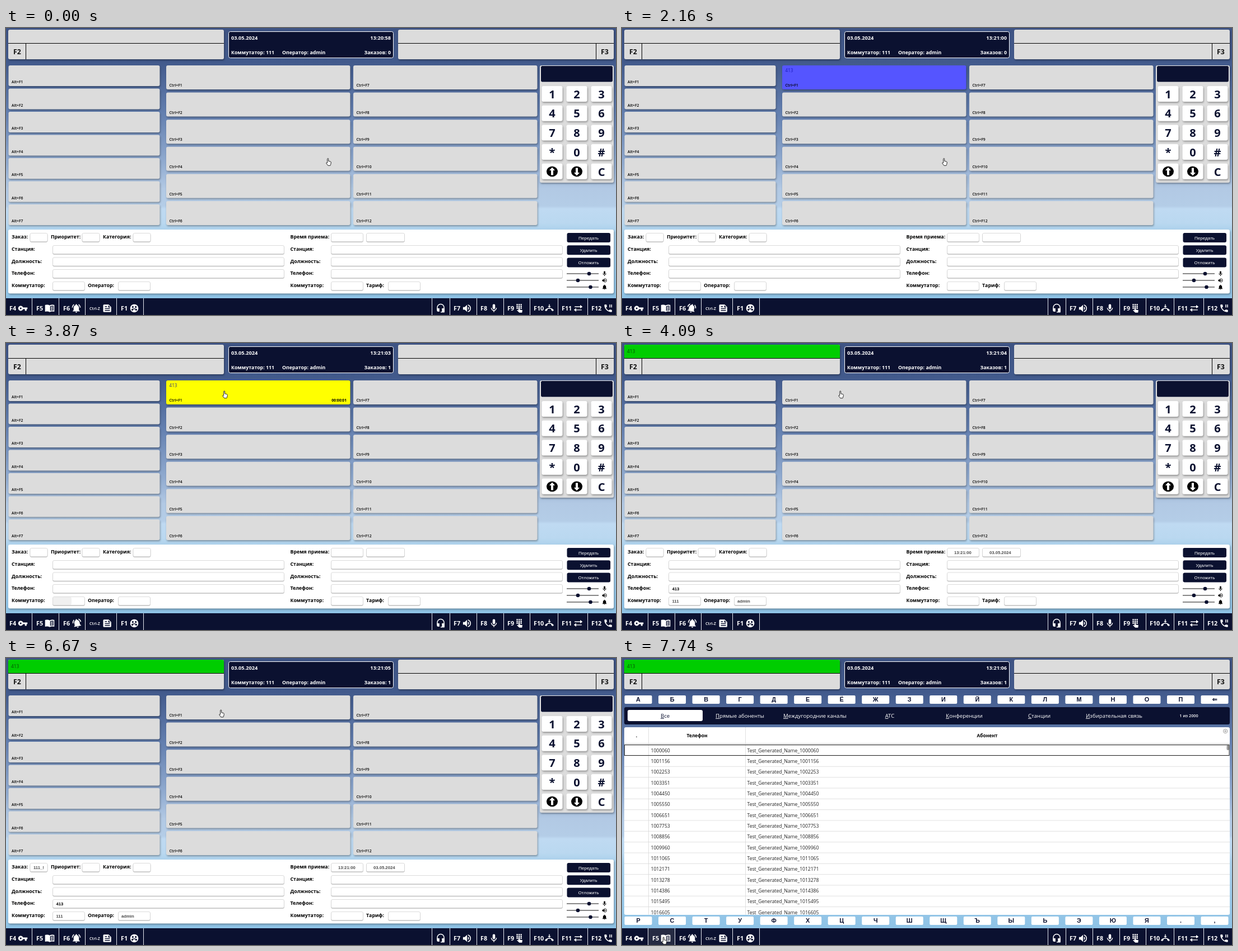
An HTML page for the animation above (8 s loop, 1089 by 514 pixels).

```html
<!DOCTYPE html>
<html lang="ru">
<head>
<meta charset="utf-8">
<title>Пульт оператора</title>
<style>
  html, body { margin: 0; width: 100%; height: 100%; overflow: hidden; background: #3f5584; }
  svg { display: block; width: 1089px; height: 514px; }
  text { font-family: "Open Sans", "Noto Sans", sans-serif; white-space: pre; }
  .b { font-weight: 700; }
  .s { font-weight: 600; }
  .arial { font-family: "Liberation Sans", Arial, sans-serif; }
  .shadow { filter: drop-shadow(1px 2px 1.5px rgba(0, 0, 0, .32)); }
  .soft { filter: drop-shadow(.5px 1px .6px rgba(0, 0, 0, .25)); }
</style>
</head>
<body>
<svg id="stage" viewBox="0 0 1089 514" xmlns="http://www.w3.org/2000/svg"></svg>
<script>
const NAVY = '#0b1130', GREY = '#dcdcdc', LOOP = 8000;

const range = (n, fn) => Array.from({ length: n }, (_, i) => fn(i)).join('');
const rect = (x, y, w, h, fill, r = 3, more = '') =>
  `<rect x="${x}" y="${y}" width="${w}" height="${h}" rx="${r}" fill="${fill}" ${more}/>`;
const line = (x1, y1, x2, y2, color = '#000', w = 1) =>
  `<path d="M${x1} ${y1}L${x2} ${y2}" stroke="${color}" stroke-width="${w}" fill="none"/>`;
const text = (x, y, str, size, fill = '#000', cls = 'b', anchor = 'start', more = '') =>
  `<text x="${x}" y="${y}" font-size="${size}" fill="${fill}" class="${cls}" text-anchor="${anchor}" ${more}>${str}</text>`;
const group = (id, body, more = '') => `<g id="${id}" ${more}>${body}</g>`;

// Icons live in a 24-unit box.
const BELL = 'M12 22c1.1 0 2-.9 2-2h-4c0 1.1.9 2 2 2zm6-6v-5c0-3.1-1.6-5.6-4.5-6.3V4a1.5 1.5 0 0 0-3 0v.7C7.6 5.4 6 7.9 6 11v5l-2 2v1h16v-1z';
const fill = d => `<path d="${d}" fill="currentColor" fill-rule="evenodd"/>`;
const stroke = (d, w = 2) => `<path d="${d}" fill="none" stroke="currentColor" stroke-width="${w}"/>`;
const ICONS = {
  key: fill('M12.6 10a6 6 0 1 0 0 4H17v4h4v-4h2v-4zM7 14a2 2 0 1 1 0-4 2 2 0 0 1 0 4z'),
  book: fill('M1 4q6-1.500 11 1 5-2.500 11-1v16q-6-1.500-11 1-5-2.500-11-1zM13 7v11q4-1.500 8-.8V6q-4-.6-8 1z') +
    stroke('M14.500 9.500l5-1M14.500 12.500l5-1M14.500 15.500l5-1', 1.4),
  bell: fill(BELL),
  ring: fill(BELL) + stroke('M6.800 3.300Q3.300 6 3 10.500M17.200 3.300Q20.700 6 21 10.500'),
  doc: fill('M4 3h11l6 6v10a2 2 0 0 1-2 2H4a2 2 0 0 1-2-2V5a2 2 0 0 1 2-2zM14 4.500V10h5.500zM6 7v2h5V7zM6 11.500v2h12v-2zM6 16v2h12v-2z'),
  people: fill('M12 1a11 11 0 1 0 0 22 11 11 0 0 0 0-22zM8 6a2.500 2.500 0 1 1 0 5 2.500 2.500 0 0 1 0-5zM16 6a2.500 2.500 0 1 1 0 5 2.500 2.500 0 0 1 0-5zM4 15q4-4 7-1-3 2-3 5-3-1-4-4zM20 15q-4-4-7-1 3 2 3 5 3-1 4-4zM12 11.500l2 1.800-2 1.800-2-1.800z'),
  headset: stroke('M4 15v-5a8 8 0 0 1 16 0v11h-8') + fill('M3 12h6v8H6a3 3 0 0 1-3-3zM15 12h6v8h-6z'),
  sound: fill('M3 9v6h4l5 5V4L7 9zM14 8q5 4 0 8z') + stroke('M14 4.300a8 8 0 0 1 0 15.400'),
  mic: fill('M12 14a3 3 0 0 0 3-3V5a3 3 0 0 0-6 0v6a3 3 0 0 0 3 3z') + stroke('M6 11a6 6 0 0 0 12 0M12 17v4'),
  dial: range(9, i => rect(4 + i % 3 * 5, 1 + (i / 3 | 0) * 4.500, 3.500, 3.500, 'currentColor', 1)) +
    fill('M9 10h3v5l7 1.500-1 6.500h-7l-6-6 1.500-1 2.500 1.200z'),
  hangup: fill('M12 13q-3 0-5 .8v3.200l-4 3-3-3q5-6 12-6t12 6l-3 3-4-3v-3.200q-2-.8-5-.8zM11 1h2v5h3l-4 4.500L8 6h3z'),
  swap: stroke('M3 8h17M21 16H4') + fill('M17 3.500L23 8l-6 4.500zM7 11.500L1 16l6 4.500z'),
  pause: fill('M20 15.500q-2 0-3.600-.6l-1 .3-2.200 2.200q-4.400-2.200-6.600-6.600l2.200-2.200.3-1Q8.500 6 8.500 4l-1-1H4L3 4a17 17 0 0 0 17 17l1-1v-3.500zM15 3h2v7h-2zM19 3h2v7h-2z')
};
const icon = (name, cx, cy, size, color = '#fff', id = '') =>
  `<g transform="translate(${cx - size / 2} ${cy - size / 2}) scale(${size / 24})" color="${color}"><g ${id && `id="${id}"`}>${ICONS[name]}</g></g>`;

function header() {
  const side = (x, split, label, cx) =>
    rect(x, 3, 385, 53, GREY, 3, 'class="shadow"') + line(x, 27.5, x + 385, 27.5) +
    line(split, 27.5, split, 56) + text(cx, 46.5, label, 12.3, '#111', 'b', 'middle');
  return side(4, 35.5, 'F2', 20) + side(700, 1053.5, 'F3', 1069) +
    group('answered', `<path d="M4 27V6a3 3 0 0 1 3-3H386a3 3 0 0 1 3 3V27z" fill="#00cd00"/>` +
      text(9, 18, '413', 8.4, '#064d06', '')) +
    rect(397.5, 6.5, 294, 47, NAVY, 3, 'stroke="#fff"') +
    text(402, 20.5, '03.05.2024', 9.2, '#fff') +
    text(687, 20.5, '', 9.2, '#fff', 'b', 'end', 'id="clock"') +
    text(402, 46.8, 'Коммутатор: 111', 8.8, '#fff') +
    text(493, 46.8, 'Оператор: admin', 8.8, '#fff') +
    text(687, 46.8, '', 8.8, '#fff', 'b', 'end', 'id="orders"');
}

function lines() {
  const alt = range(7, i => rect(4.5, 67 + 41.5 * i, 270, 37, GREY));
  const altLabels = range(7, i => text(10, 99.3 + 41.5 * i, `Alt+F${i + 1}`, 6.8, '#000', 's'));
  const ctrl = range(12, i => {
    const x = i < 6 ? 286 : 620, y = 67 + 48.6 * (i % 6);
    return rect(x, y, 328.5, 43, GREY, 3, i ? '' : 'id="line"');
  });
  const ctrlLabels = range(12, i =>
    text(i < 6 ? 291.5 : 625.5, 105.2 + 48.6 * (i % 6), `Ctrl+F${i + 1}`, 6.8, '#000', 's'));
  return `<g class="shadow">${alt}${ctrl}</g>` + altLabels + ctrlLabels +
    text(291.5, 79, '413', 8.1, '#2020b8', '', 'start', 'id="caller"') +
    text(608, 105, '', 6.7, '#000', 'b', 'end', 'id="timer"');
}

function keypad() {
  const keys = [...'123456789*0#', '', '', 'C'];
  const cx = i => 975 + 44 * (i % 3), cy = i => 118 + 34.7 * (i / 3 | 0);
  const arrow = (x, flip) =>
    `<g transform="translate(${x} 257) scale(1 ${flip})"><ellipse rx="10" ry="9.3" fill="#000"/>` +
    `<path d="M0-7.500L5-2H2V6.500H-2V-2H-5z" fill="#fff"/></g>`;
  return rect(953, 67, 132, 210, GREY, 3, 'class="shadow"') +
    rect(954.5, 67.5, 129, 29.5, NAVY, 3, 'stroke="#eee"') +
    `<g class="shadow">${range(15, i => rect(cx(i) - 18.5, cy(i) - 14, 37, 28, '#fff'))}</g>` +
    keys.map((k, i) => k && text(cx(i), cy(i) + 7.7, k, 20, NAVY, 'b', 'middle')).join('') +
    arrow(975, 1) + arrow(1019, -1);
}

function form() {
  const ys = [367, 389, 410.5, 432, 454];
  const labels = [
    [10, 0, 'Заказ:'], [80, 0, 'Приоритет:'], [173, 0, 'Категория:'], [507.5, 0, 'Время приема:'],
    [146, 4, 'Оператор:'], [643, 4, 'Тариф:']
  ];
  ['Станция:', 'Должность:', 'Телефон:', 'Коммутатор:'].forEach((s, i) =>
    labels.push([10, i + 1, s], [507.5, i + 1, s]));
  const fields = [
    [43, 0, 31], [136, 0, 31], [227, 0, 31], [580.5, 0, 57], [643.5, 0, 68],
    [83.5, 4, 57], [200.5, 4, 57], [580.5, 4, 57], [682.5, 4, 57]
  ];
  for (const row of [1, 2, 3]) fields.push([83.5, row, 413], [580.5, row, 413]);
  const value = (x, row, s, color = '#4c4c4c') => text(x, ys[row] + 11, s, 7.7, color, 'b arial');
  const button = (y, s) => rect(1001.5, y, 77.5, 17, NAVY) +
    text(1040, y + 11.8, s, 8.1, '#fff', 'arial', 'middle');
  const slider = (y, x, name) => line(1001, y, 1058, y, '#111', 1.2) +
    `<circle cx="${x}" cy="${y}" r="3.300" fill="${NAVY}"/>` + icon(name, 1068.5, y, 11, '#000');
  return rect(4, 361, 1081, 114.5, '#fff', 3, 'class="shadow"') +
    labels.map(([x, row, s]) => text(x, ys[row] + 10, s, 8.8)).join('') +
    `<g class="soft">${fields.map(([x, row, w]) =>
      rect(x, ys[row] + .5, w, 15, '#fff', 2.5, 'stroke="#d2d2d2" stroke-width=".8"')).join('')}</g>` +
    SHADES.map(([x, row, w], i) => rect(x + .4, ys[row] + .9, w, 14.2, '#f0f0f0', 2, `id="shade${i}"`)).join('') +
    group('details', value(593, 0, '13:21:00') + value(656, 0, '03.05.2024') +
      value(89.5, 3, '413', '#000') + value(89.5, 4, '111') + value(206, 4, 'admin')) +
    group('order', value(49, 0, '111_!')) +
    button(367, 'Передать') + button(389.3, 'Удалить') + button(411.5, 'Отложить') +
    slider(440, 1041, 'mic') + slider(452, 1021, 'sound') + slider(464, 1043.5, 'bell');
}

function footer() {
  const items = [
    ['F4', 6, 'key', 30, 18], ['F5', 54, 'book', 78, 18], ['F6', 102, 'ring', 125.5, 19],
    ['F1', 205, 'people', 229, 16], ['', 0, 'headset', 776, 18], ['F7', 799, 'sound', 823, 19],
    ['F8', 847, 'mic', 871, 18], ['F9', 895, 'dial', 917, 17], ['F10', 942, 'hangup', 970, 16],
    ['F11', 992, 'swap', 1021.5, 17], ['F12', 1045, 'pause', 1075, 18]
  ];
  return rect(0, 484, 1089, 30, NAVY, 0) + rect(47, 484, 47, 30, '#262b43', 0, 'id="hover"') +
    [46.5, 94.5, 141.5, 197.5, 245.5, 760.5, 792.5, 840.5, 888.5, 935.5, 985.5, 1038.5]
      .map(x => line(x, 484, x, 514, '#e4e6ee')).join('') +
    items.map(([s, x, name, cx, size]) => text(x, 505.7, s, 10.8, '#fff') +
      icon(name, cx, 502, size, '#fff', name === 'ring' ? 'bellIcon' : '')).join('') +
    text(149, 504.7, 'Ctrl-Z', 7.2, '#fff', 's') + icon('doc', 181, 502, 18);
}

function phonebook() {
  const letters = (str, y) => [...str].map((c, i) => rect(4.5 + 60.53 * i, y, 49, 15, '#fff', 2) +
    text(29 + 60.53 * i, y + 11.2, c, 10.8, NAVY, 'b arial', 'middle')).join('');
  const tabs = [[77, 'Все'], [210.5, 'Прямые абоненты'], [344.5, 'Междугородние каналы'], [478, 'АТС'],
    [611, 'Конференции'], [745, 'Станции'], [878.5, 'Избирательная связь']];
  const pitch = 19.33;
  const row = i => {
    const phone = 1000060 + 1096 * i + i * (i - 1) / 2, y = 168.8 + pitch * i;
    return line(4, 175 + pitch * i, 1085, 175 + pitch * i, '#d9d9d9', .8) +
      text(51.5, y, phone, 8.55, '#222', '') +
      text(223.5, y, 'Test_Generated_Name_' + phone, 8.55, '#222', '');
  };
  return letters('АБВГДЕЁЖЗИЙКЛМНОП⇐', 67) + letters('РСТУФХЦЧШЩЪЫЬЭЮЯ.,', 463) +
    rect(4, 88, 1081, 31, NAVY) + rect(10, 93, 134, 20, '#fff') +
    tabs.map(([x, s], i) => text(x, 106.8, `<tspan text-decoration="underline">${s[0]}</tspan>${s.slice(1)}`,
      9.6, i ? '#fff' : NAVY, '', 'middle')).join('') +
    text(1012, 105.8, '1 из 2000', 7.3, '#fff', 's', 'middle') +
    rect(4, 124, 1081, 336, '#fff') + rect(4, 152.5, 1081, 3, '#e4e4e4', 0) +
    text(26, 141.8, '.', 8.6, '#000', 'b', 'middle') + text(134, 141.8, 'Телефон', 8.4, '#000', 'b', 'middle') +
    text(652, 141.8, 'Абонент', 8.4, '#000', 'b', 'middle') +
    '<path d="M1073.500 131a3.700 3.700 0 1 0 7.400 0a3.700 3.700 0 1 0-7.400 0M1075 131h4.400M1077.200 128.800v4.400" fill="none" stroke="#888" stroke-width=".8"/>' +
    [47.5, 220.5].map(x => line(x, 124, x, 459.5, '#d9d9d9', .8)).join('') +
    `<g clip-path="url(#tableClip)">${range(16, row)}</g>` +
    rect(1079.5, 156, 4.5, 9, '#9a9a9a', 2) +
    rect(4.5, 155.7, 1079.5, 18.8, 'none', 0, 'stroke="#222"');
}

const HAND = 'M2.700 8.500V1.500a1 1 0 0 1 2 0V5.300l3.600.9q1.200.4 1 1.800l-.6 3.400-.8 1.900H3.800L.9 9.400q-.5-1.200.6-1.100z';
const ARROW = 'M.5.5V9.300L2.500 7.500 4 10.700 5.400 10 4 7H6.800z';

// Steps: [start ms, value]
const CLOCK = [[0, '20:58'], [200, '20:59'], [1510, '21:00'], [2600, '21:01'], [3220, '21:02'],
  [3870, '21:03'], [4090, '21:04'], [5610, '21:05'], [6880, '21:06']];
const LINE = [[0, 'idle'], [2160, 'call'], [3220, 'wait'], [4090, 'idle']];
const TIMER = [[0, ''], [3220, '00:00:00'], [3870, '00:00:01'], [4090, '']];
const TILT = [[0, 0], [2160, 12], [2380, -12], [2800, 12], [3010, -12], [3220, 12],
  [3440, -12], [3650, 12], [3870, -12], [4090, 0]];
const POINTER = [[0, ['hand', 571, 233]], [2800, ['hand', 569, 227]], [3010, ['arrow', 383, 48.5]],
  [3220, ['hand', 386, 85.5]], [6670, ['hand', 380, 92.5]], [6880, ['arrow', 80.5, 426]],
  [7090, ['none', 0, 0]], [7310, ['hand', 70.5, 499.5]]];
// Field tints: x, row, width, from, to
const SHADES = [[136, 0, 30.2, 2800, 3220], [227, 0, 30.2, 2800, 3220], [580.5, 0, 43, 3010, 3220],
  [200.5, 4, 56.2, 2800, 3220], [83.5, 4, 56.2, 2380, 3220], [83.5, 4, 33, 3220, 4090], [83.5, 4, 9, 7090, 7740]];
const LINE_FILL = { idle: GREY, call: '#5555ff', wait: '#ffff00' };
const CALLER_FILL = { idle: 'none', call: '#1c1cc0', wait: '#3c3c78' };

const stage = document.getElementById('stage');
const SKY = [[0, '#3e5383'], [.12, '#425a8c'], [.3, '#6480b0'], [.48, '#94aed2'], [.56, '#b2c9e4'],
  [.62, '#b4cde7'], [.63, '#bfdaf2'], [.68, '#bad8f0'], [.71, '#a8cfea'], [.93, '#8fc3e6'], [1, '#8fc3e6']];
stage.innerHTML =
  `<defs><linearGradient id="sky" x2="0" y2="1">${SKY.map(([o, c]) => `<stop offset="${o}" stop-color="${c}"/>`).join('')}</linearGradient>` +
  `<clipPath id="tableClip"><rect x="4" y="153" width="1081" height="306.500"/></clipPath></defs>` +
  rect(0, 0, 1089, 514, 'url(#sky)', 0) + header() +
  group('panel', lines() + keypad() + form()) + group('book', phonebook()) + footer() +
  '<path id="pointer" fill="#fff" stroke="#111" stroke-width=".9" stroke-linejoin="round"/>';

const $ = id => document.getElementById(id);
const show = (id, on) => $(id).setAttribute('visibility', on ? 'visible' : 'hidden');
const at = (steps, t) => steps.reduce((v, [start, next]) => t >= start ? next : v, steps[0][1]);

function render(t) {
  const state = at(LINE, t), [shape, x, y] = at(POINTER, t), book = t >= 7740;
  $('clock').textContent = '13:' + at(CLOCK, t);
  $('orders').textContent = 'Заказов: ' + (t < 3220 ? 0 : 1);
  $('line').setAttribute('fill', LINE_FILL[state]);
  $('caller').setAttribute('fill', CALLER_FILL[state]);
  $('timer').textContent = at(TIMER, t);
  $('bellIcon').setAttribute('transform', `rotate(${at(TILT, t)} 12 4)`);
  $('panel').style.display = book ? 'none' : '';
  $('book').style.display = book ? '' : 'none';
  show('answered', t >= 4090);
  show('details', t >= 4090);
  show('order', t >= 4530);
  show('hover', t >= 7310);
  SHADES.forEach(([, , , from, to], i) => show('shade' + i, t >= from && t < to));
  show('pointer', shape !== 'none');
  $('pointer').setAttribute('d', shape === 'hand' ? HAND : ARROW);
  $('pointer').setAttribute('transform', `translate(${x} ${y})`);
}

const start = performance.now();
function frame(now) {
  render(Math.max(0, now - start) % LOOP);
  requestAnimationFrame(frame);
}
render(0);
requestAnimationFrame(frame);
</script>
</body>
</html>
```
